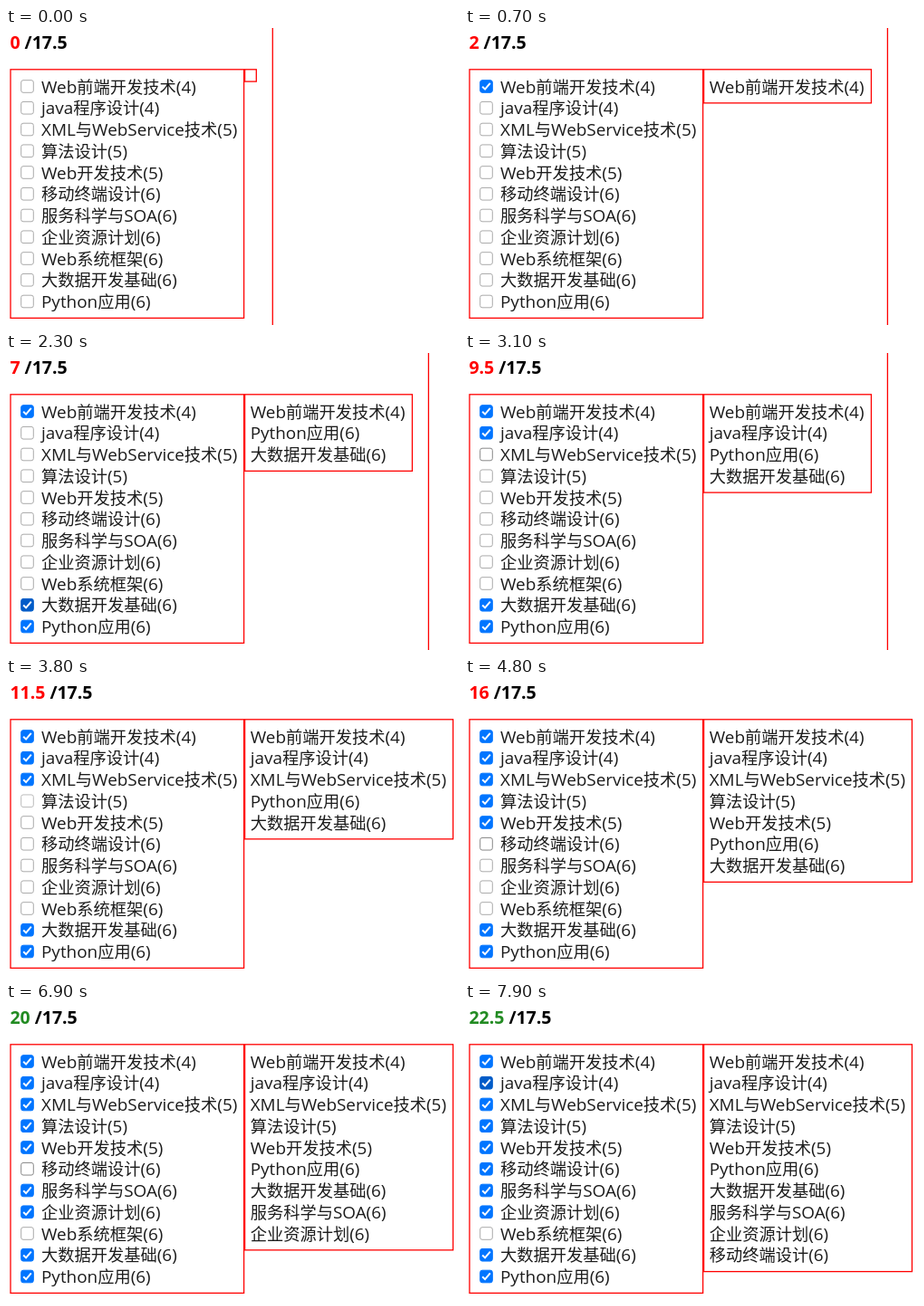
An HTML page that plays this animation: 500x328 px, repeating every 8 s.

```html
<!DOCTYPE html>
<html lang="zh">
<head>
<meta charset="utf-8">
<style>
html, body { margin: 0; width: 100%; height: 100%; overflow: hidden; background: #fff; }
svg { display: block; }
text { font: 18.9px "Open Sans", "Noto Sans", sans-serif; fill: #1c1c1c; }
.han { font: 18.25px "Noto Sans CJK SC", "Noto Sans CJK", sans-serif; }
.sum { font-size: 19.5px; font-weight: 700; fill: #000; }
.line { fill: none; stroke: #f00; stroke-width: 1.3; }
.tick { fill: none; stroke: #fff; stroke-width: 2; }
</style>
</head>
<body>
<svg id="stage" width="500" height="328" viewBox="0 0 500 328"></svg>
<script>
const LOOP = 8000, STEP = 23.75;
const stage = document.getElementById('stage');

// name, term, credits
const courses = [
  ['Web前端开发技术', 4, 2], ['java程序设计', 4, 2.5], ['XML与WebService技术', 5, 2],
  ['算法设计', 5, 2.5], ['Web开发技术', 5, 2], ['移动终端设计', 6, 2.5],
  ['服务科学与SOA', 6, 2], ['企业资源计划', 6, 2], ['Web系统框架', 6, 2],
  ['大数据开发基础', 6, 2.5], ['Python应用', 6, 2.5]
].map(([name, term, credit]) => ({ label: `${name}(${term})`, term, credit }));

// time, row under the pointer, action
const events = [
  [200, 0], [700, 0, 'check'], [700, -1], [800, 2], [900, 4], [1000, 6], [1100, 8], [1200, 10],
  [1400, 10, 'press'], [1500, 10, 'check'], [1700, 9], [2200, 9, 'press'], [2300, 9, 'check'],
  [2400, 7], [2500, 5], [2600, 3], [2700, 1], [2900, 1, 'press'], [3000, 1, 'check'],
  [3100, 2], [3200, 2, 'press'], [3400, 2, 'check'], [3600, 3], [3800, 3, 'press'], [3900, 3, 'check'],
  [4100, 4], [4200, 4, 'press'], [4300, 4, 'check'], [4800, 5], [5000, 6], [5100, 6, 'press'],
  [5200, 6, 'check'], [5500, 7], [5800, 7, 'press'], [5900, 7, 'check'], [6400, 6], [6500, 4],
  [6900, 5], [7000, 7], [7200, 5], [7400, 5, 'press'], [7500, 5, 'check'],
  [7700, 4], [7800, 2], [7900, 1]
];

const frame = (left, right, rows) =>
  `<rect class="line" x="${left}" y="45.8" width="${right - left}" height="${13.3 + rows * STEP}"/>`;

const label = (course, x, row) => `<text x="${x}" y="${71.7 + row * STEP}">` +
  course.label.replace(/[\u4e00-\u9fff]+/g, '<tspan class="han">$&</tspan>') + '</text>';

function checkbox(row, checked, hover, pressed) {
  const [fill, edge] = checked
    ? Array(2).fill(hover ? '#005cc8' : '#0075ff')
    : ['#fff', pressed ? '#bbb' : hover ? '#888' : '#aaa'];
  return `<g transform="translate(23.5 ${64.5 + row * STEP})">
    <rect x="-6.8" y="-6.8" width="13.6" height="13.6" rx="2.3" fill="${fill}" stroke="${edge}"/>
    ${checked ? '<path class="tick" d="M-4.3 .2L-1.4 3.1L4.3 -3.6"/>' : ''}</g>`;
}

function draw(count) {
  const picked = [];
  let pointer = -1, pressed = false;
  for (const [, row, action] of events.slice(0, count)) {
    pointer = row;
    pressed = action === 'press';
    if (action === 'check') picked.push(courses[row]);
  }
  const sum = picked.reduce((total, c) => total + c.credit, 0);
  const right = picked.includes(courses[2]) ? 493.4 : picked.length ? 448.4 : 276.3;
  const chosen = [...picked].sort((a, b) => a.term - b.term);

  stage.innerHTML =
    `<text class="sum" x="4.4" y="22.7"><tspan fill="${sum > 17.5 ? '#228b22' : '#f00'}">${sum}</tspan> /17.5</text>` +
    `<path class="line" d="M${right + 18} 0V328"/>` +
    frame(5, 262.6, courses.length) + frame(263.6, right, chosen.length) +
    courses.map((c, i) => checkbox(i, picked.includes(c), i === pointer, i === pointer && pressed) + label(c, 39, i)).join('') +
    chosen.map((c, i) => label(c, 269.7, i)).join('');
}

let shown = -1;
function tick() {
  const t = performance.now() % LOOP;
  const count = events.filter(e => e[0] <= t).length;
  if (count !== shown) draw(shown = count);
  requestAnimationFrame(tick);
}
tick();
</script>
</body>
</html>
```
